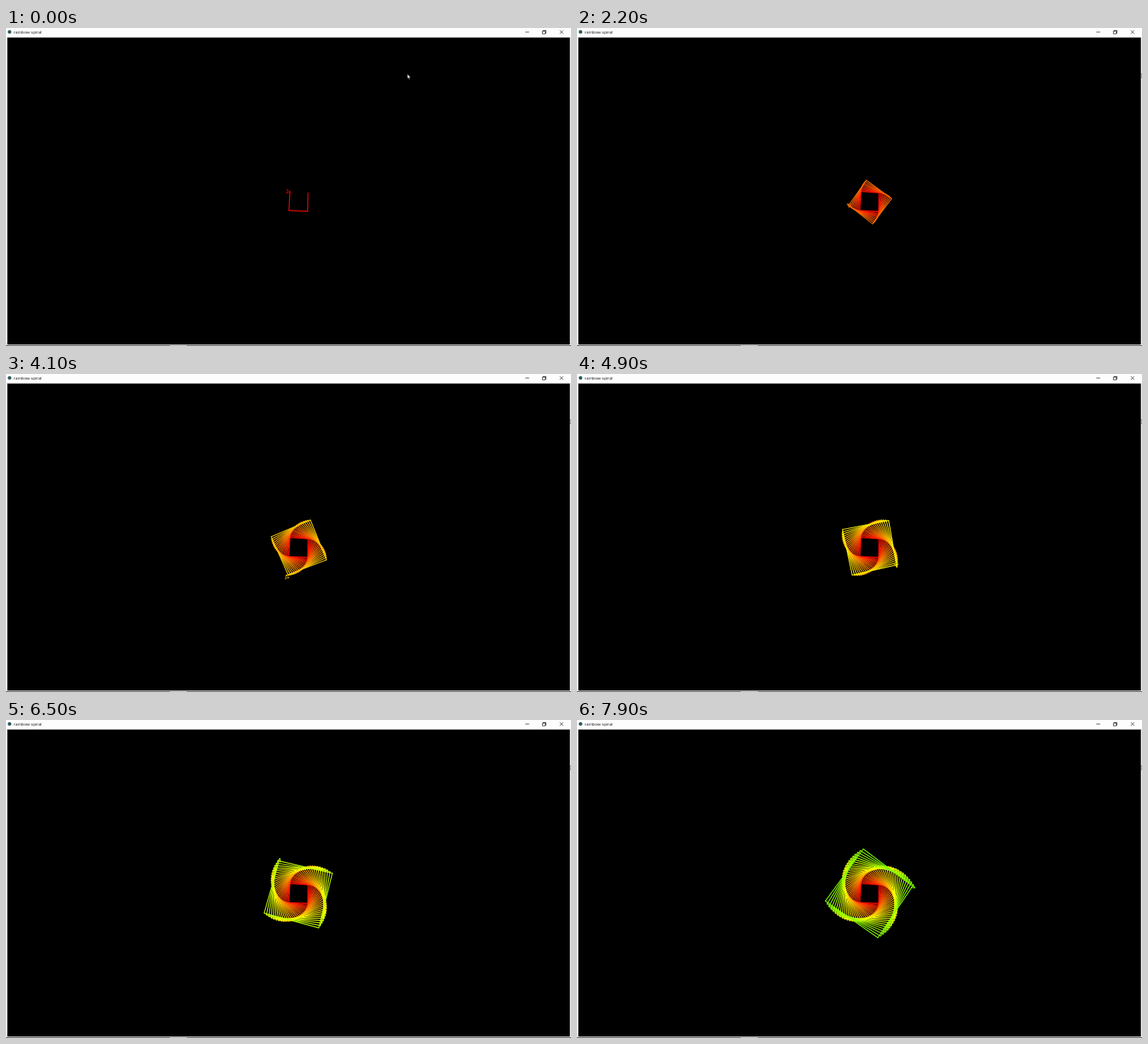
Recreate the animation shown at these times as an HTML page with a canvas. Size 800 px wide and 450 px high, loop 8 s.

```html
<!DOCTYPE html>
<html lang="en">
<head>
<meta charset="utf-8">
<title>rainbow spiral</title>
<style>
html, body { margin: 0; width: 800px; height: 450px; overflow: hidden; background: #000; }
canvas, svg { position: absolute; left: 0; top: 0; }
text { font: 6px "Open Sans", "Noto Sans", sans-serif; fill: #111; }
</style>
</head>
<body>
<canvas id="stage" width="800" height="450"></canvas>
<svg width="800" height="450" fill="none">
  <!-- window frame and title bar -->
  <path fill="#fdfdfd" d="M0 0H800V449H0ZM2 13.5V448H798.5V13.5Z" fill-rule="evenodd"/>
  <path stroke="#8a8a8a" stroke-width=".6" d="M1.7 448V13.3H798.5"/>
  <path stroke="#333" d="M0 449.5H800"/>
  <path stroke="#888" d="M232 449.5H256"/>
  <circle cx="5" cy="5.5" r="2.5" fill="#2c5a5c"/>
  <text x="11" y="8">rainbow spiral</text>
  <g stroke="#222" stroke-width=".8">
    <path d="M735.3 5.8H740.7"/>
    <path d="M759.5 4.5H763.5V8.3H759.5ZM760.6 4.4V3.4H764.6V7.3H763.6"/>
    <path d="M784.2 3.3L789 8.2M789 3.3L784.2 8.2"/>
  </g>
  <path id="cursor" fill="#fff" stroke="#000" stroke-width=".4" d="M0 0V6.3L1.4 5L2.4 7.4L3.4 7L2.4 4.7H4.4Z"/>
</svg>
<script>
const ctx = document.getElementById('stage').getContext('2d');
const cursor = document.getElementById('cursor');
const LOOP = 8000, TURN = 91 * Math.PI / 180, UNIT = 0.52;

// [ms, segments finished]; a fraction above one half means the pen has turned
const pace = [[0, 3.7], [2200, 38.2], [3300, 57.2], [4100, 69.7],
  [5600, 89.7], [6500, 106.2], [7900, 127.2], [8000, 128.8]];

function progress(t) {
  const i = pace.findIndex(p => p[0] > t);
  const [t0, n0] = pace[i - 1], [t1, n1] = pace[i];
  return n0 + (n1 - n0) * (t - t0) / (t1 - t0);
}

function drawPen(x, y, angle) {
  ctx.save();
  ctx.translate(x, y);
  ctx.rotate(angle);
  ctx.scale(UNIT, UNIT);
  ctx.lineWidth = 1.3;
  ctx.beginPath();
  ctx.moveTo(0, 0);
  ctx.lineTo(-9, -5);
  ctx.lineTo(-7, 0);
  ctx.lineTo(-9, 5);
  ctx.closePath();
  ctx.stroke();
  ctx.restore();
}

function drawSpiral(done) {
  const last = Math.floor(done);
  let x = 427.6, y = 233.3;
  ctx.lineWidth = 1.2;
  ctx.lineCap = 'round';
  for (let k = 1; k <= last; k++) {
    const length = 26 + UNIT * (k - 1);
    ctx.strokeStyle = `hsl(${k * 0.72}, 100%, 50%)`;
    ctx.beginPath();
    ctx.moveTo(x, y);
    x += length * Math.cos(k * TURN);
    y += length * Math.sin(k * TURN);
    ctx.lineTo(x, y);
    ctx.stroke();
  }
  drawPen(x, y, (last + (done - last > 0.5)) * TURN);
}

function frame(now) {
  const t = Math.floor(now % LOOP / 100) * 100;
  ctx.fillStyle = '#000';
  ctx.fillRect(0, 0, 800, 450);
  drawSpiral(progress(t));
  const p = Math.min(1, t / 800), slide = p * p * (3 - 2 * p);
  cursor.setAttribute('transform', `translate(${568.4 + 230.6 * slide} ${65.3 - slide})`);
  requestAnimationFrame(frame);
}
requestAnimationFrame(frame);
</script>
</body>
</html>
```
